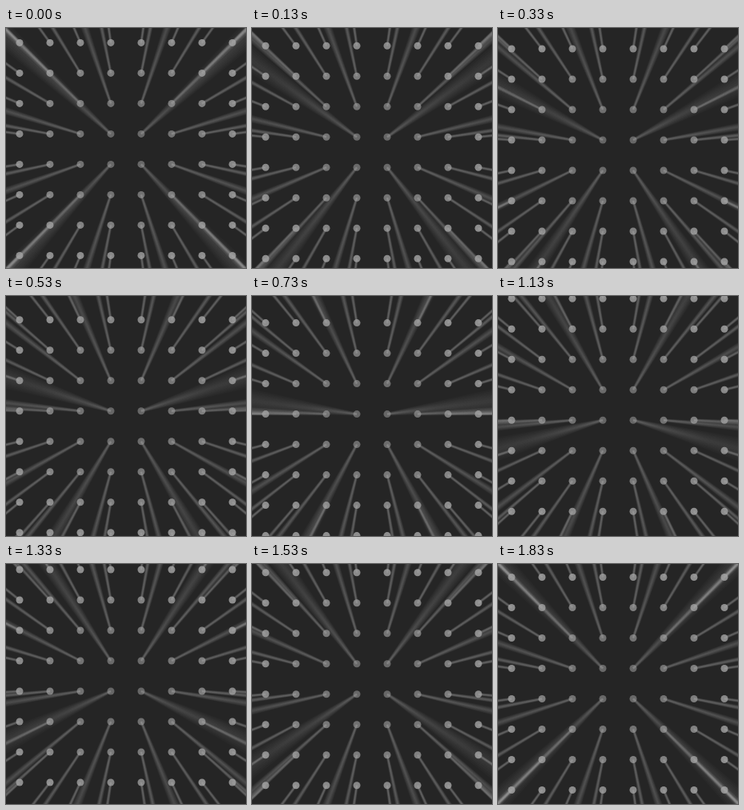
Recreate the animation shown at these times as an HTML page with a canvas. Size 300x300 px, loop 1.93 s.

```html
<!DOCTYPE html>
<html>
<head>
<meta charset="utf-8">
<style>
html, body { margin: 0; width: 100%; height: 100%; overflow: hidden; background: #252525; }
canvas { display: block; width: 300px; height: 300px; }
</style>
</head>
<body>
<canvas id="stage" width="300" height="300"></canvas>
<script>
const ctx = document.getElementById('stage').getContext('2d');
const LOOP = 1930, FIRST = 30, STEP = 100, STEPS = 20;
const CENTER = 150, SPACING = 38, DOT = 4.5, REACH = 260;
const LAYERS = 6, BEAM_WIDTH = 3.6;

// A beam is a wedge aimed at the centre, widening and fading outward from its dot.
function beam(x, y) {
  const r = Math.hypot(x, y);
  if (r > REACH) return;
  const fade = ctx.createRadialGradient(0, 0, r, 0, 0, REACH);
  for (let i = 0; i <= 8; i++) {
    const u = i / 8;
    const scale = 1 + u * u * (REACH / r - 1);
    const alpha = 0.11 * Math.pow(scale, -0.7);
    fade.addColorStop(u * u, `rgba(165,165,165,${alpha})`);
  }
  ctx.save();
  ctx.rotate(Math.atan2(y, x));
  ctx.fillStyle = fade;
  for (let i = 1; i <= LAYERS; i++) {
    const near = BEAM_WIDTH / 2 * i / LAYERS;
    const far = near * REACH / r;
    ctx.beginPath();
    ctx.moveTo(r, -near);
    ctx.lineTo(REACH, -far);
    ctx.lineTo(REACH, far);
    ctx.lineTo(r, near);
    ctx.fill();
  }
  ctx.restore();
}

function dot(x, y) {
  const gray = Math.min(142, 96 + Math.hypot(x, y) * 0.3);
  ctx.fillStyle = `rgb(${gray},${gray},${gray})`;
  ctx.beginPath();
  ctx.arc(x, y, DOT, 0, Math.PI * 2);
  ctx.fill();
}

function eachDot(shift, paint) {
  for (let row = -5; row <= 4; row++)
    for (let col = -4; col < 4; col++)
      paint((col + 0.5) * SPACING, (row + 0.5) * SPACING + shift);
}

function draw(now) {
  const t = now % LOOP;
  const step = t < FIRST ? 0 : 1 + Math.floor((t - FIRST) / STEP);
  const shift = 1.4 + step * SPACING / STEPS;
  ctx.setTransform(1, 0, 0, 1, 0, 0);
  ctx.fillStyle = '#252525';
  ctx.fillRect(0, 0, 300, 300);
  ctx.translate(CENTER, CENTER);
  eachDot(shift, dot);
  eachDot(shift, beam);
  requestAnimationFrame(draw);
}
requestAnimationFrame(draw);
</script>
</body>
</html>
```
